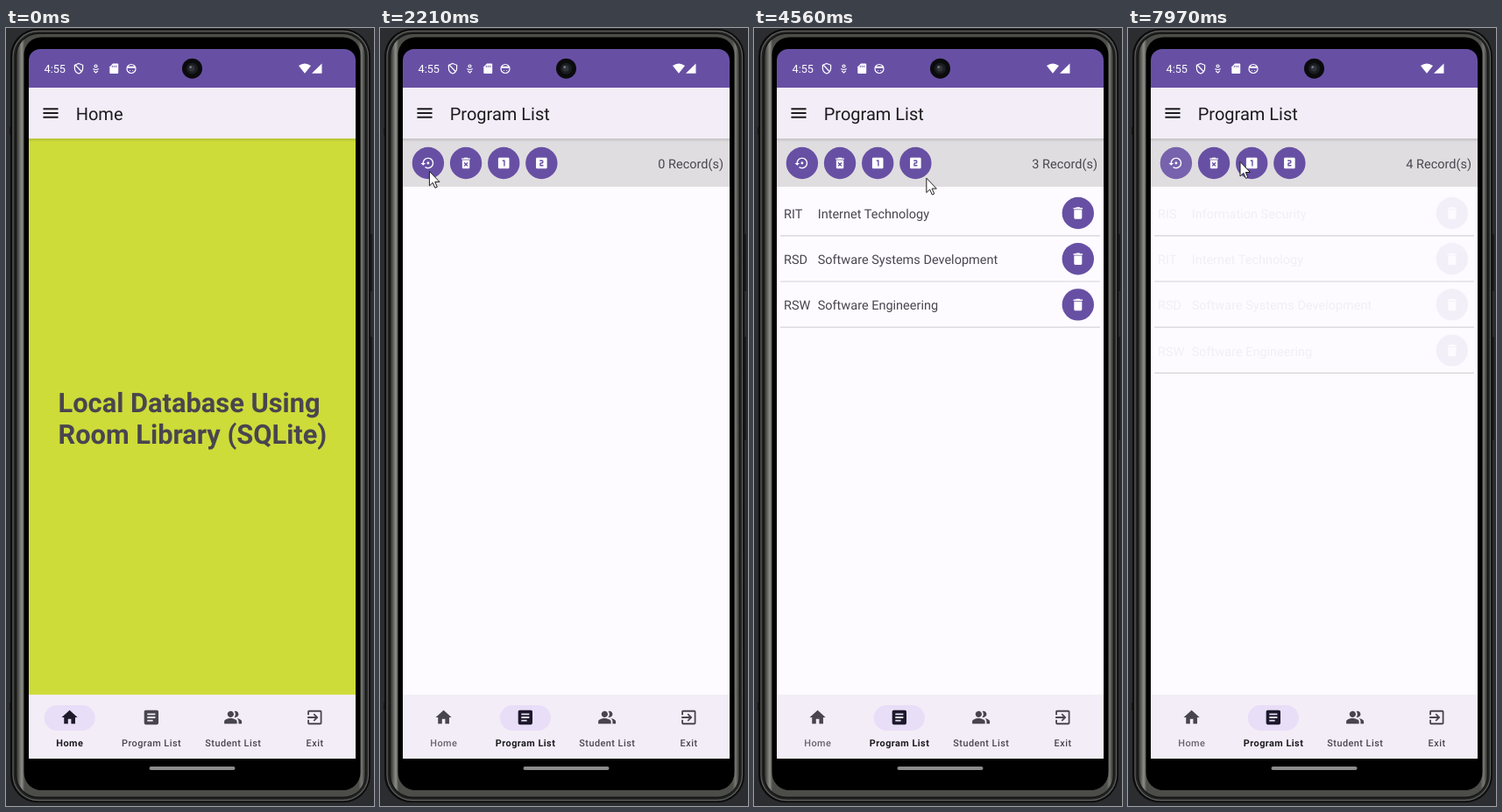
An HTML page for the animation above (8000 ms loop, 420 by 887 pixels).

```html
<!DOCTYPE html>
<html lang="en">
<head>
<meta charset="utf-8">
<title>Room Library demo</title>
<style>
html, body { margin: 0; width: 100%; height: 100%; overflow: hidden; background: #2b2d30; }
svg { display: block; width: 100vw; height: 100vh; }
text { font-family: Roboto, sans-serif; fill: #49454f; white-space: pre; text-rendering: geometricPrecision; }
.title { font-size: 20px; fill: #1c1b1f; }
.big { font-size: 30.8px; font-weight: 700; }
.body { font-size: 14.5px; }
.label { font-size: 10.9px; font-weight: 500; letter-spacing: .45px; text-anchor: middle; }
</style>
</head>
<body>
<svg id="stage" viewBox="0 0 420 887" xmlns="http://www.w3.org/2000/svg">
  <defs>
    <linearGradient id="metal" x1="0" x2="1" y1="0" y2="0">
      <stop offset="0" stop-color="#2c2c2b"/>
      <stop offset=".015" stop-color="#8f8f89"/>
      <stop offset=".023" stop-color="#4c4c49"/>
      <stop offset=".98" stop-color="#4c4c49"/>
      <stop offset=".99" stop-color="#777773"/>
      <stop offset="1" stop-color="#2c2c2b"/>
    </linearGradient>
    <linearGradient id="shade" x1="0" x2="0" y1="0" y2="1">
      <stop offset="0" stop-opacity=".13"/>
      <stop offset="1" stop-opacity="0"/>
    </linearGradient>
    <clipPath id="screen"><rect x="26" y="24" width="373" height="831" rx="13"/></clipPath>
  </defs>

  <rect width="420" height="887" fill="#2b2d30"/>
  <path d="M4 113h5v9H4zM4 769h5v9H4zM413 235h5v65h-5zM413 352h5v118h-5z" fill="#191a1b"/>
  <rect x="5" y="1" width="411" height="882" rx="31" fill="#0c0c0c"/>
  <rect x="8" y="3.5" width="405.500" height="877" rx="29" fill="#222323" stroke="#5c5c5a" stroke-width="1.300"/>
  <rect x="10.500" y="5.500" width="400.500" height="872.500" rx="27" fill="#141414"/>
  <rect x="12" y="7" width="398" height="869.500" rx="25" fill="url(#metal)"/>
  <rect x="20.500" y="10.500" width="384" height="858.500" rx="20" fill="#000"/>

  <g clip-path="url(#screen)">
    <rect x="26" y="24" width="373" height="831" fill="#000"/>
    <rect x="26" y="126" width="373" height="634" fill="#cddc39"/>
    <text class="big" x="59.500" y="437.500">Local Database Using</text>
    <text class="big" x="59.500" y="473.600">Room Library (SQLite)</text>
    <g id="page">
      <rect x="26" y="126" width="373" height="634" fill="#fdfbff"/>
      <rect x="26" y="126" width="373" height="55" fill="#e0dde0"/>
      <g id="rows"></g>
    </g>
    <g id="bar">
      <g id="tools"></g>
      <text id="count" class="body" x="392" y="160" text-anchor="end"></text>
    </g>
    <rect x="26" y="126" width="373" height="4" fill="url(#shade)"/>
    <rect x="26" y="24" width="373" height="44" fill="#6750a4"/>
    <rect x="26" y="68" width="373" height="58" fill="#f3edf7"/>
    <text x="43.500" y="51" style="font-size:12.7px;fill:#fff">4:55</text>
    <g fill="none" stroke="#fff" stroke-width="1.200">
      <path d="M83 40.500l4.600 1.800v3.700c0 3-2 5-4.600 6-2.600-1-4.600-3-4.600-6v-3.700zM79.500 42.500l7 7.500"/>
      <circle cx="102.500" cy="43.500" r="1.500"/>
      <path d="M99.300 46.500q3.200 2 6.400 0M100.300 49l2.200 2 2.200-2"/>
      <circle cx="143" cy="46.500" r="5"/>
      <path d="M138.500 44.700h9" stroke-width="2"/>
      <path d="M141 48.500h.8M144.300 48.500h.8"/>
    </g>
    <path d="M122 40.500h5.200q1 0 1 1v9.500q0 1-1 1h-7.900q-1 0-1-1v-6.800z" fill="#fff"/>
    <path d="M121.300 42.800v2M123.400 42.800v2M125.500 42.800v2" stroke="#6750a4"/>
    <path d="M334 43q7-5.200 14 0l-7 8.800zM360.500 40.500v11.300h-11.500z" fill="#fff"/>
    <circle cx="212.500" cy="46.200" r="11.500" fill="#0b0b0d"/>
    <circle cx="212.500" cy="46.200" r="6.500" fill="#1b1c20"/>
    <circle cx="212" cy="46" r="3.600" fill="#30343a"/>
    <circle cx="210.700" cy="44.600" r="1.300" fill="#777d86"/>
    <text id="title" class="title" x="79.700" y="105"></text>
    <rect x="26" y="760" width="373" height="73" fill="#f3edf7"/>
    <g id="nav"></g>
    <rect x="163.500" y="842" width="98" height="4" rx="2" fill="#8b8b8b"/>
  </g>
  <path id="cursor" d="M.5.500V17L4.300 13.400 7 19.400 9.400 18.300 6.800 12.500H12Z"
        fill="#fff" stroke="#1d1d1d" stroke-linejoin="round"/>
</svg>
<script>
const LOOP = 8000, PITCH = 52.2, LIT = .1;
const $ = id => document.getElementById(id);

const box = 'M19 3H5c-1.1 0-2 .9-2 2v14c0 1.100.9 2 2 2h14c1.100 0 2-.9 2-2V5c0-1.100-.9-2-2-2z';
const bin = 'M6 19c0 1.100.9 2 2 2h8c1.100 0 2-.9 2-2V7H6v12z';
const icons = {
  menu: 'M3 18h18v-2H3v2zm0-5h18v-2H3v2zm0-7v2h18V6H3z',
  home: 'M10 20v-6h4v6h5v-8h3L12 3 2 12h3v8z',
  article: box + 'm-5 14H7v-2h7v2zm3-4H7v-2h10v2zm0-4H7V7h10v2z',
  people: 'M16.670 13.130C18.040 14.060 19 15.320 19 17v3h4v-3c0-2.180-3.570-3.470-6.330-3.870zM15 12c2.210 0 4-1.790 4-4s-1.790-4-4-4c-.47 0-.91.1-1.330.24C14.500 5.270 15 6.580 15 8s-.5 2.730-1.330 3.760c.42.14.86.24 1.330.24zM9 12c2.210 0 4-1.790 4-4s-1.790-4-4-4-4 1.790-4 4 1.790 4 4 4zm0 1c-2.670 0-8 1.340-8 4v3h16v-3c0-2.660-5.330-4-8-4z',
  exit: 'M10.090 15.590L11.500 17l5-5-5-5-1.410 1.410L12.670 11H3v2h9.670l-2.580 2.590zM19 3H5c-1.110 0-2 .9-2 2v4h2V5h14v14H5v-4H3v4c0 1.100.89 2 2 2h14c1.100 0 2-.9 2-2V5c0-1.100-.9-2-2-2z',
  restore: 'M14 12c0-1.100-.9-2-2-2s-2 .9-2 2 .9 2 2 2 2-.9 2-2zm-2-9c-4.970 0-9 4.030-9 9H0l4 4 4-4H5c0-3.870 3.130-7 7-7s7 3.130 7 7-3.130 7-7 7c-1.510 0-2.910-.49-4.060-1.300l-1.420 1.440C8.040 20.300 9.940 21 12 21c4.970 0 9-4.030 9-9s-4.030-9-9-9z',
  wipe: bin + 'm2.460-7.120l1.410-1.410L12 12.590l2.120-2.120 1.410 1.410L13.410 14l2.120 2.120-1.410 1.410L12 15.410l-2.120 2.120-1.410-1.410L10.590 14l-2.130-2.120zM15.500 4l-1-1h-5l-1 1H5v2h14V4z',
  one: box + 'm-5 14h-2V9h-2V7h4v10z',
  two: box + 'm-4 8c0 1.110-.9 2-2 2h-2v2h4v2H9v-4c0-1.110.9-2 2-2h2V9H9V7h4c1.100 0 2 .89 2 2v2z',
  trash: bin + 'M19 4h-3.500l-1-1h-5l-1 1H5v2h14V4z'
};

const icon = (name, x, y, k, fill) =>
  `<path d="${icons[name]}" fill="${fill}" fill-rule="evenodd" transform="translate(${x} ${y}) scale(${k}) translate(-12 -12)"/>`;

const button = (name, x, y, k) =>
  `<circle cx="${x}" cy="${y}" r="18.200" fill="#6750a4"/>
   <circle class="lit" cx="${x}" cy="${y}" r="18.200" fill="#fff" opacity="0"/>` + icon(name, x, y, k, '#fff');

$('title').insertAdjacentHTML('beforebegin', icon('menu', 51, 97, .95, '#1c1b1f'));

$('tools').innerHTML = ['restore', 'wipe', 'one', 'two']
  .map((name, i) => button(name, 54.9 + 43.15 * i, 154, .7)).join('');

$('nav').innerHTML = [['home', 'Home'], ['article', 'Program List'], ['people', 'Student List'], ['exit', 'Exit']]
  .map(([name, label], i) => {
    const x = 72.6 + 93.250 * i;
    return `<rect class="pill" y="772" height="29" rx="14.500" fill="#e8def8"/>${icon(name, x, 786, .907, '#49454f')}
      <text class="label" x="${x + .2}" y="818.700">${label}</text>`;
  }).join('');

$('rows').innerHTML = [['RIS', 'Information Security'], ['RIT', 'Internet Technology'],
  ['RSD', 'Software Systems Development'], ['RSW', 'Software Engineering']]
  .map(([code, name]) => `<g class="row"><path class="line" d="M30 236.800H395" stroke="#d6d3d7" stroke-width="1.200"/>
    <g class="cell"><text class="body" x="34" y="217">${code}</text><text class="body" x="72.700" y="217">${name}</text>
    ${button('trash', 369.800, 211, .75)}</g></g>`).join('');

const all = (id, sel) => [...$(id).querySelectorAll(sel)];
const toolLit = all('tools', '.lit'), rows = all('rows', '.row'), lines = all('rows', '.line'),
  cells = all('rows', '.cell'), rowLit = all('rows', '.lit'),
  pills = all('nav', '.pill'), navIcons = all('nav', 'path'), labels = all('nav', 'text');

// Pointer path: time, x, y
const path = [
  [70, 254, 862], [330, 190, 811], [600, 150, 776], [740, 150, 776], [920, 162, 788], [1400, 162, 788],
  [1620, 126, 520], [1870, 87, 221], [2210, 56, 163], [2340, 44, 151], [2680, 46, 153], [2830, 127, 156],
  [3240, 340, 198], [3560, 386, 219], [3760, 370, 207], [4240, 370, 207], [4520, 210, 172],
  [4850, 100, 161], [5600, 100, 161], [5850, 104, 157], [6250, 145, 158], [6880, 145, 158],
  [7150, 90, 156], [7420, 53, 157], [7800, 53, 157], [7970, 127, 152], [8000, 142, 153]
];

const ramp = (t, a, b) => Math.min(1, Math.max(0, (t - a) / (b - a)));
const ease = u => (1 - Math.cos(Math.PI * u)) / 2;
const pulse = (t, on, off) => ramp(t, on, on + 120) * (1 - ramp(t, off, off + 120));
const set = (el, name, value) => el.setAttribute(name, value);

function pointer(t) {
  const i = Math.max(1, path.findIndex(p => p[0] >= t));
  const [a, b] = [path[i - 1], path[i]], u = ramp(t, a[0], b[0]);
  return [a[1] + (b[1] - a[1]) * u, a[2] + (b[2] - a[2]) * u];
}

function drawNav(t) {
  const active = t < 1130 ? 0 : 1;
  const press = pulse(t, 740, 1130);
  pills.forEach((pill, i) => {
    const pressed = i === 1 && !active;
    const w = i !== active ? (pressed ? 58 : 0) : i ? 58 * (.4 + .6 * ease(ramp(t, 1130, 1320))) : 58;
    set(pill, 'x', 72.6 + 93.250 * i - w / 2);
    set(pill, 'width', w);
    set(pill, 'fill', pressed ? '#ddd7e2' : '#e8def8');
    set(pill, 'opacity', pressed ? press : 1);
    const on = i === active;
    set(navIcons[i], 'fill', on ? '#1d192b' : '#49454f');
    labels[i].style.fill = on || (pressed && press > .5) ? '#1c1b1f' : i ? '#49454f' : '#66636b';
    labels[i].style.fontWeight = on ? 700 : 500;
  });
  $('title').textContent = active ? 'Program List' : 'Home';
}

function drawList(t) {
  const fade = ramp(t, 1130, 1390);
  set($('page'), 'opacity', fade);
  set($('bar'), 'opacity', fade);
  const count = t < 2800 ? 0 : t < 4040 ? 4 : t < 5340 ? 3 : t < 7930 ? 0 : 4;
  $('count').textContent = count + ' Record(s)';
  const again = t > 7000;
  const lift = again ? 0 : PITCH * ease(ramp(t, 4240, 4490));
  rows.forEach((row, i) => {
    const end = i ? 5350 : 4090;
    const shown = again ? ramp(t, 7962, 8102) : ramp(t, 2820, 2960) * (1 - ramp(t, end, end + 110));
    set(row, 'transform', `translate(0 ${PITCH * i - (i ? lift : 0)})`);
    set(cells[i], 'opacity', shown);
    set(lines[i], 'opacity', t >= 7950 || (t >= 2810 && t < end) ? 1 : 0);
  });
  set(rowLit[0], 'opacity', LIT * pulse(t, 3850, 4300));
  const lit = [pulse(t, 2480, 3850) + pulse(t, 7620, 9000), pulse(t, 5050, 6250), pulse(t, 6250, 7620), 0];
  toolLit.forEach((el, i) => set(el, 'opacity', LIT * lit[i]));
}

function draw(t) {
  drawNav(t);
  drawList(t);
  const [x, y] = pointer(t);
  set($('cursor'), 'transform', `translate(${x} ${y})`);
  set($('cursor'), 'opacity', t < 70 ? 0 : 1);
}

const start = performance.now();
function tick() {
  draw((performance.now() - start) % LOOP);
  requestAnimationFrame(tick);
}
tick();
</script>
</body>
</html>
```
